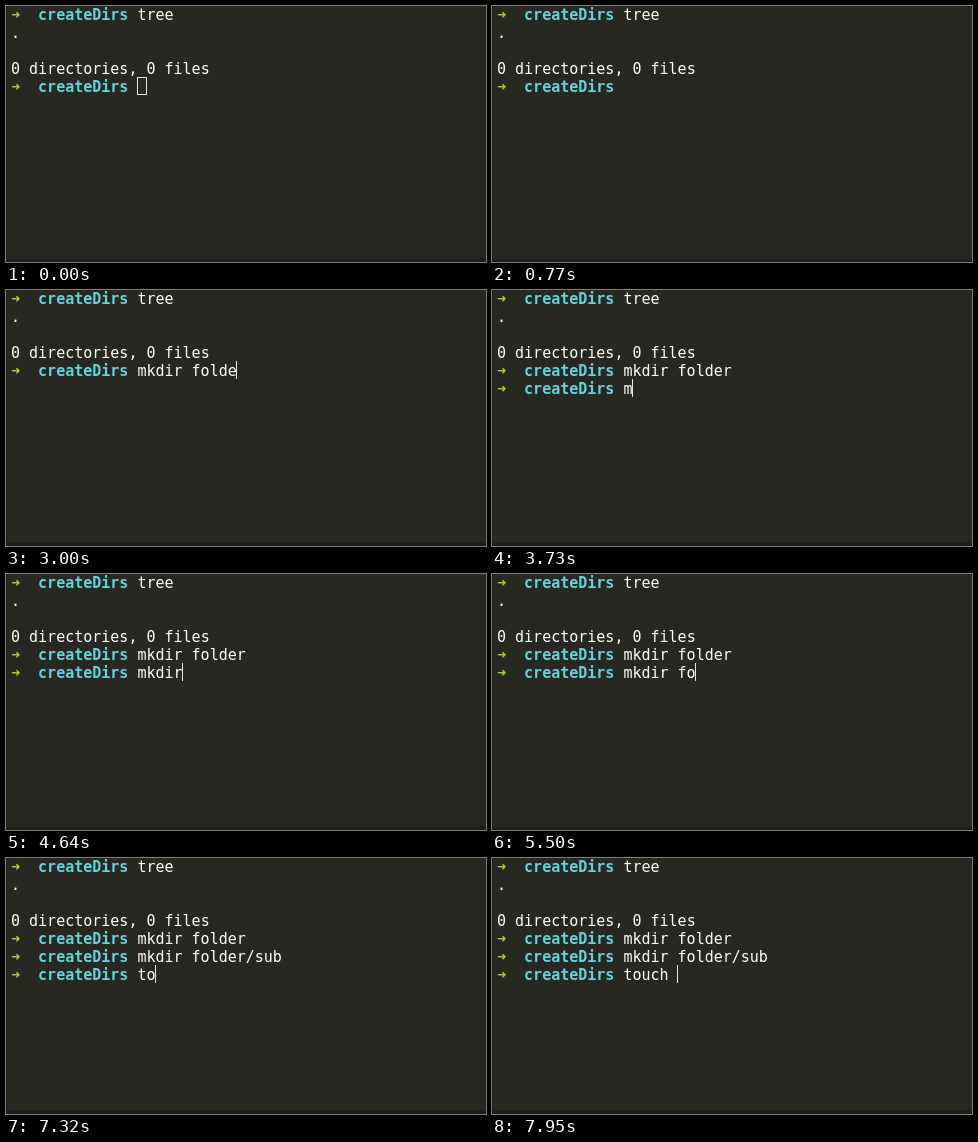
An HTML page that plays this animation: 480x256 px, repeating every 8000 ms.

```html
<!DOCTYPE html>
<html lang="en">
<head>
<meta charset="utf-8">
<title>Terminal</title>
<style>
html, body { margin: 0; width: 100%; height: 100%; overflow: hidden; background: #282822; }
#screen {
  position: relative; width: 480px; height: 256px; overflow: hidden;
  background: #282822; color: #fdfdfa;
  font: 15px/18px "DejaVu Sans Mono", monospace;
  box-sizing: border-box;
  border-left: 1px solid #1d1d19;
}
#screen::after {
  content: ""; position: absolute; left: -1px; right: 0; bottom: 0; height: 4px;
  background: linear-gradient(#24201d, #211819);
}
.row { position: absolute; left: 4px; white-space: pre; height: 18px; }
.row span { position: absolute; top: 0; }
.arrow { left: 0; color: #a3d83c; font-weight: bold; }
.dir { left: 27.09px; color: #66d2da; font-weight: bold; }
.cmd { left: 126.42px; }
#cursor { position: absolute; box-sizing: border-box; height: 18px; width: 1px; background: #e6e6e2; }
#cursor.hollow { width: 10px; background: none; border: 1px solid #e6e6e2; }
</style>
</head>
<body>
<div id="screen"><div id="cursor"></div></div>
<script>
const LOOP = 8000, CELL = 9.03, LINE = 18, LEFT = 4, PROMPT = 14;
const screen = document.getElementById('screen');
const cursor = document.getElementById('cursor');

function addRow(line, html) {
  const row = document.createElement('div');
  row.className = 'row';
  row.style.top = line * LINE + 'px';
  row.innerHTML = html;
  screen.appendChild(row);
  return row;
}

function addPrompt(line, text = '') {
  return addRow(line, '<span class="arrow">➜</span><span class="dir">createDirs</span>' +
    `<span class="cmd">${text}</span>`);
}

addPrompt(0, 'tree');
addRow(1, '.');
addRow(3, '0 directories, 0 files');

// Each key is [time, characters it adds].
const commands = [
  { line: 4, start: 0, keys: [
    [1250, 'm'], [1400, 'k'], [1550, 'd'], [1700, 'i'], [1820, 'r'], [1980, ' '],
    [2520, 'f'], [2640, 'o'], [2760, 'l'], [2880, 'd'], [3000, 'e'], [3150, 'r']] },
  { line: 5, start: 3400, keys: [
    [3640, 'm'], [3900, 'k'], [4150, 'd'], [4350, 'i'], [4550, 'r'], [5050, ' '],
    [5250, 'f'], [5400, 'o'], [5620, 'lder/'], [5950, 's'], [6150, 'u'], [6350, 'b']] },
  { line: 6, start: 6800, keys: [
    [7150, 't'], [7320, 'o'], [7460, 'u'], [7600, 'c'], [7720, 'h'], [7860, ' ']] }
];
for (const command of commands) {
  command.row = addPrompt(command.line);
  command.text = command.row.querySelector('.cmd');
}

function draw() {
  const t = performance.now() % LOOP;
  for (const { line, start, keys, row, text } of commands) {
    const active = t >= start;
    row.style.display = active ? '' : 'none';
    if (!active) continue;
    const typed = keys.filter(([time]) => time <= t).map(key => key[1]).join('');
    if (text.textContent !== typed) text.textContent = typed;
    cursor.style.left = Math.floor(LEFT + 1 + (PROMPT + typed.length) * CELL) - 1 + 'px';
    cursor.style.top = line * LINE - 1 + 'px';
  }
  cursor.className = t < 600 ? 'hollow' : '';
  cursor.style.visibility = t >= 600 && t < 1000 ? 'hidden' : 'visible';
  requestAnimationFrame(draw);
}
draw();
</script>
</body>
</html>
```
